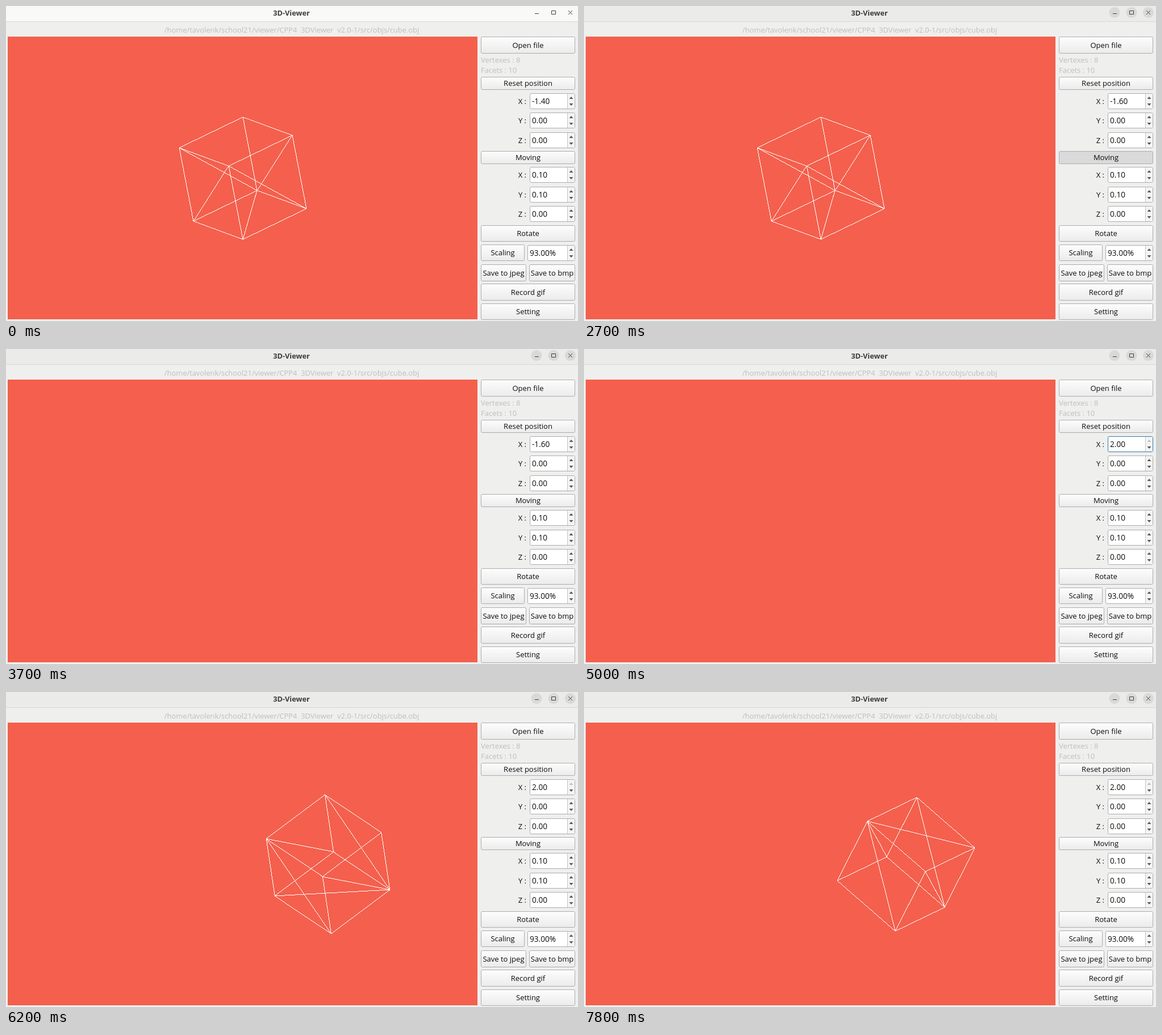
Animation, 1007 px wide and 556 px high, one loop 8 s. Source, as an HTML page:

```html
<!DOCTYPE html>
<html lang="en">
<head>
<meta charset="utf-8">
<title>3D-Viewer</title>
<style>
  html, body { margin: 0; width: 100%; height: 100%; overflow: hidden; background: #efefee; }
  #stage { display: block; width: 100%; height: 100%; }
  text { font: 13px "Open Sans", "Noto Sans", sans-serif; fill: #0c0c0c; white-space: pre; }
  .num { font-size: 13.6px; }
  .dim { fill: #bebebe; }
  .path { font-size: 12.9px; }
  .title { font-weight: bold; font-size: 12.8px; fill: #3d3d3d; }
  .box { stroke: #acacac; }
  .button { fill: url(#raised); }
  .pressed { fill: #dadada; }
  .field { fill: #fff; }
  .focused { stroke: #3079ab; }
  .icon { fill: none; stroke: #3d3d3d; }
  .arrow { fill: #565656; }
  .off { fill: #bebebe; }
  #wire { fill: none; stroke: #fff; shape-rendering: crispEdges; }
</style>
</head>
<body>
<svg id="stage" viewBox="0 0 1007 556" preserveAspectRatio="none"></svg>
<script>
const LOOP = 8000, SIDE = 144, CENTER_X = 417, CENTER_Y = 304, PIXELS_PER_UNIT = 125;
const stage = document.getElementById('stage');

// ---- Window and side panel ----
const label = (x, y, text, cls = '', anchor = 'middle') =>
  `<text x="${x}" y="${y}" class="${cls}" text-anchor="${anchor}">${text}</text>`;

const box = (x, y, right, bottom, cls, id = '') =>
  `<rect id="${id}" class="box ${cls}" x="${x + .5}" y="${y + .5}" width="${right - x}" height="${bottom - y}" rx="2"/>`;

const button = (text, y, bottom, x = 836, right = 1001, id = '') =>
  box(x, y, right, bottom, 'button', id) +
  label((x + right + 1) / 2, Math.round((y + bottom) / 2) + 5, text);

const spin = (mid, value, x = 922, id = 'spin') =>
  box(x, mid - 14, 1001, mid + 13, 'field', id + 'Box') +
  `<path d="M989 ${mid - 13}h12v26h-12z" fill="#f4f4f4"/>
   <path d="M988.5 ${mid - 13}v26" stroke="#c4c4c4"/>
   <path id="${id}Up" class="arrow" d="M991.5 ${mid - 4}h7l-3.5 -4z"/>
   <path class="arrow" d="M991.5 ${mid + 4}h7l-3.5 4z"/>
   <text id="${id}Value" class="num" x="${x + 4}" y="${mid + 5}">${value}</text>`;

const axisRow = (name, mid, value, id) =>
  label(916, mid + 5, name + ' :', '', 'end') + spin(mid, value, 922, id || name + mid);

stage.innerHTML = `
  <defs><linearGradient id="raised" x2="0" y2="1">
    <stop stop-color="#fdfdfd"/><stop offset="1" stop-color="#ebebeb"/>
  </linearGradient></defs>
  <rect width="1007" height="556" fill="#efefee"/>
  <rect id="bar" width="1007" height="27"/>
  <path d="M0 27.5h1007" stroke="#d8d8d6"/>
  ${label(502.5, 17, '3D-Viewer', 'title')}
  <g id="rings" fill="#d9d9d7">${[934, 964, 993.5].map(x => `<circle cx="${x}" cy="11.5" r="9.5"/>`).join('')}</g>
  <path class="icon" d="M931 13.5h7M960.5 8.5h7v6h-7zM990 8l7 7m0 -7l-7 7"/>
  ${label(503, 47, '/home/tavolenk/school21/viewer/CPP4  3DViewer  v2.0-1/src/objs/cube.obj', 'dim path')}
  <svg x="3" y="54" width="827" height="499" viewBox="3 54 827 499">
    <rect x="3" y="54" width="827" height="499" fill="#f4604d"/>
    <path id="wire"/>
  </svg>
  ${button('Open file', 54, 83)}
  ${label(836, 100, 'Vertexes : 8', 'dim', 'start')}
  ${label(836, 118, 'Facets : 10', 'dim', 'start')}
  ${button('Reset position', 125, 147)}
  ${axisRow('X', 168, '-1.40', 'moveX')}
  ${axisRow('Y', 202, '0.00')}
  ${axisRow('Z', 237, '0.00')}
  ${button('Moving', 256, 278, 836, 1001, 'moving')}
  ${axisRow('X', 298, '0.10')}
  ${axisRow('Y', 333, '0.10')}
  ${axisRow('Z', 367, '0.00')}
  ${button('Rotate', 387, 415)}
  ${button('Scaling', 421, 449, 836, 912)}
  ${spin(436, '93.00%', 918, 'scale')}
  ${button('Save to jpeg', 456, 485, 836, 915)}
  ${button('Save to bmp', 456, 485, 921, 1001)}
  ${button('Record gif', 490, 519)}
  ${button('Setting', 525, 553)}`;

// ---- Cube: corner index bits are the a, b and c axes ----
const EDGES = [];
for (let i = 0; i < 8; i++)
  for (const bit of [1, 2, 4]) if (!(i & bit)) EDGES.push([i, i | bit]);
EDGES.push([1, 4], [2, 4], [3, 5], [3, 6], [4, 7]);  // triangle diagonals

const dot = (u, v) => u[0] * v[0] + u[1] * v[1] + u[2] * v[2];
const cross = (u, v) => [
  u[1] * v[2] - u[2] * v[1], u[2] * v[0] - u[0] * v[2], u[0] * v[1] - u[1] * v[0]];
const unit = v => v.map(n => n / Math.hypot(...v));

// Each pose gives the screen x and y extents of the three cube axes.
const pose = (time, x, y) => {
  const rows = [unit(x), unit(y)];
  return { time, rows: [...rows, cross(...rows)] };
};
const POSES = [
  pose(5900, [87, -112, 25], [32, 54, 129]),
  pose(6200, [-103, -99, 15], [78, -67, 101]),
  pose(6600, [57, -131, -18], [-68, -13, -126]),
  pose(7000, [102, 87, 53], [89, -42, -105]),
];

// Screen-space cube axes at a time, turning about one axis between two poses.
function cubeAxes(t) {
  const n = POSES.filter(p => p.time <= t).length - 1;
  const from = POSES[Math.max(n, 0)], to = POSES[n + 1];
  const axes = [0, 1, 2].map(i => from.rows.map(row => row[i]));
  if (n < 0 || !to) return axes;

  const r = to.rows.map(q => from.rows.map(p => dot(q, p)));
  const k = unit([r[2][1] - r[1][2], r[0][2] - r[2][0], r[1][0] - r[0][1]]);
  let u = (t - from.time) / (to.time - from.time);
  if (n === 2) u = 1 - (1 - u) ** 2;
  const angle = u * Math.acos((r[0][0] + r[1][1] + r[2][2] - 1) / 2);
  const c = Math.cos(angle), s = Math.sin(angle);
  return axes.map(v => {
    const side = cross(k, v), along = dot(k, v) * (1 - c);
    return v.map((x, i) => x * c + side[i] * s + k[i] * along);
  });
}

// One-pixel line without smoothing: a single pixel per step of the longer side.
function pixelLine([x0, y0], [x1, y1]) {
  const steps = Math.ceil(Math.max(Math.abs(x1 - x0), Math.abs(y1 - y0)));
  let d = '';
  for (let i = 0; i < steps; i++) {
    const u = (i + .5) / steps;
    d += `M${Math.floor(x0 + (x1 - x0) * u)} ${Math.floor(y0 + (y1 - y0) * u) + .5}h1`;
  }
  return d;
}

function wirePath(t, centerX) {
  const axes = cubeAxes(t);
  const corner = i => [centerX, CENTER_Y].map((center, d) => center + SIDE *
    axes.reduce((sum, axis, bit) => sum + axis[d] * ((i >> bit & 1) - .5), 0));
  return EDGES.map(([i, j]) => pixelLine(corner(i), corner(j))).join('');
}

// ---- Timeline ----
const CLICKS = [  // press, release, distance
  [2700, 2800, -1.6], [2900, 3000, -1.6], [3300, 3400, -1.6],
  [5100, 5200, 2], [5300, 5400, 2], [5500, 5700, 2],
];
const within = (t, a, b) => t >= a && t < b;
const byId = id => document.getElementById(id);
let shown = -1;

function draw() {
  requestAnimationFrame(draw);
  const t = Math.floor(performance.now() % LOOP / 100) * 100;
  if (t === shown) return;
  shown = t;

  const active = t >= 1400, atMax = t >= 4400;
  byId('bar').setAttribute('fill', active ? '#ebebe9' : '#f9f9f8');
  byId('rings').style.display = active ? '' : 'none';

  byId('moveXValue').textContent =
    atMax ? '2.00' : t >= 1600 ? '-1.60' : t >= 1500 ? '-1.50' : '-1.40';
  byId('moveXUp').classList.toggle('off', atMax);
  byId('moveXBox').classList.toggle('focused', within(t, 1500, 2700) || within(t, 4000, 5100));
  byId('moving').classList.toggle('pressed', CLICKS.some(([a, b]) => within(t, a, b)));

  const shift = CLICKS.reduce((sum, [, release, d]) => sum + (t >= release ? d : 0), 0);
  byId('wire').setAttribute('d', wirePath(t, CENTER_X + shift * PIXELS_PER_UNIT));
}
draw();
</script>
</body>
</html>
```
